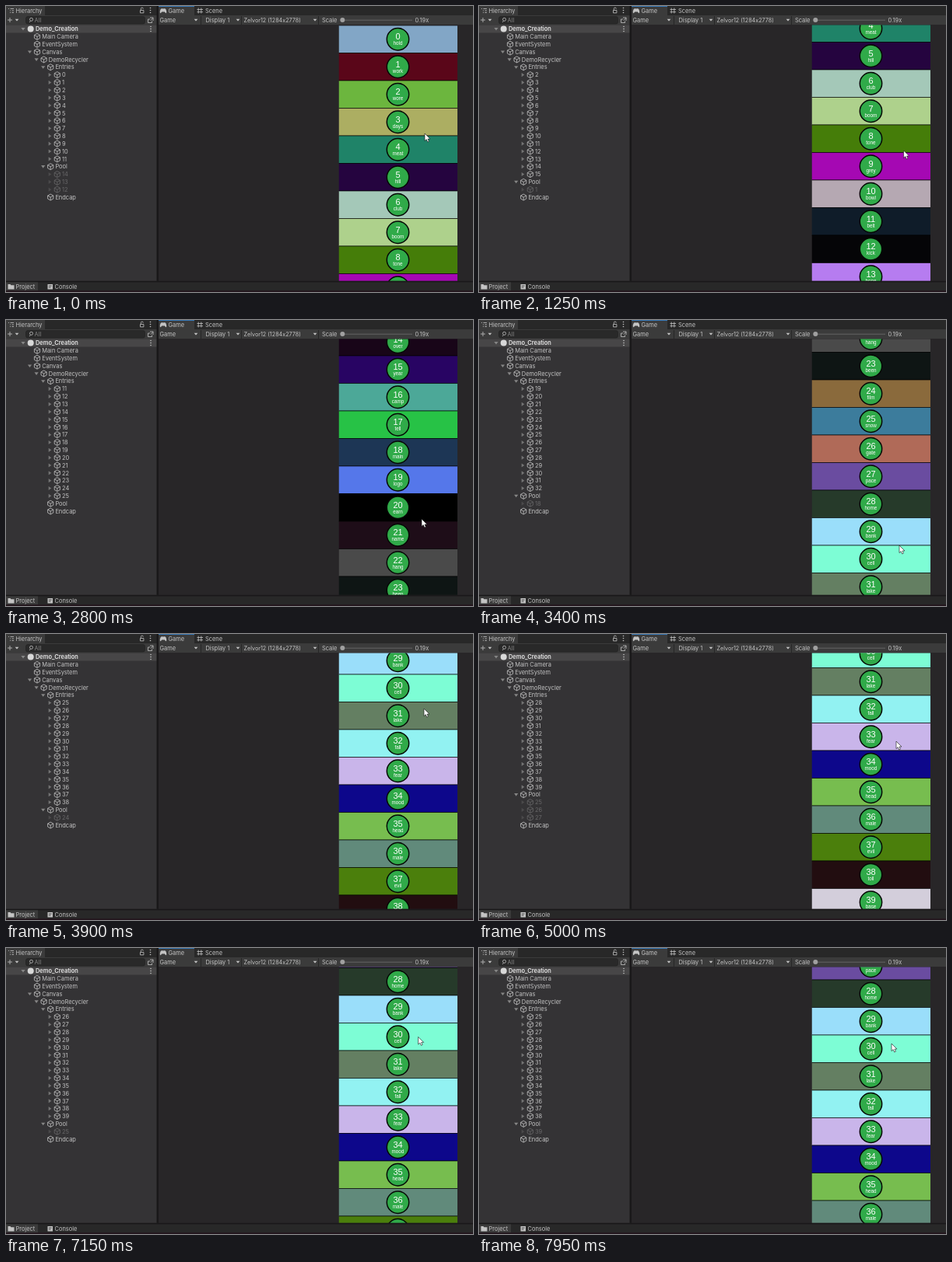
Write an HTML page that moves like this. It is 600 px wide and 368 px high and loops after 8000 ms.

```html
<!DOCTYPE html>
<html lang="en">
<head>
<meta charset="utf-8">
<title>Recycler list demo</title>
<style>
html, body { margin: 0; width: 100%; height: 100%; overflow: hidden; background: #282628; }
svg { display: block; width: 600px; height: 368px; }
text { font: 7.45px Inter, Roboto, sans-serif; fill: #c4c4c4; }
.bold { font-weight: 600; fill: #e6e6e6; }
.dim { fill: #858585; }
.off { opacity: .36; }
.line { fill: none; stroke: #c4c4c4; stroke-width: .8; }
.num, .word { font-family: "Liberation Sans", Arial, sans-serif; fill: #fff; text-anchor: middle; }
.num { font-size: 11px; }
.word { font-size: 6.3px; }
</style>
</head>
<body>
<svg viewBox="0 0 600 368">
  <defs>
    <clipPath id="view"><rect x="427.5" y="24.5" width="152.5" height="329.5"/></clipPath>
    <g id="cube" class="line"><path d="M0-4 3.6-2V2L0 4-3.6 2V-2ZM-3.6-2 0 0 3.6-2M0 0V4"/></g>
    <path id="open" d="M-2.6-1.6H2.6L0 2Z" fill="#858585"/>
    <path id="shut" d="M-1.6-2.6V2.6L2 0Z" fill="#747474"/>
    <path id="drop" d="M-2.4-1.2H2.4L0 1.6Z" fill="#c4c4c4"/>
    <g id="dots" fill="#c4c4c4"><circle cy="-3" r=".8"/><circle r=".8"/><circle cy="3" r=".8"/></g>
  </defs>

  <rect width="600" height="368" fill="#282628"/>

  <!-- Hierarchy panel -->
  <rect width="194" height="354" fill="#343335"/>
  <rect width="194" height="12" fill="#282828"/>
  <rect width="50" height="12" fill="#3b3b3b"/>
  <rect y="12" width="194" height="12" fill="#3b3b3b"/>
  <rect y="24.5" width="194" height="10" fill="#474647"/>
  <path class="line" d="M3 3.5H4M5.5 3.5H10M5 6H6M7.5 6H10M5 8.5H6M7.5 8.5H10"/>
  <text x="12.5" y="8.8">Hierarchy</text>
  <path class="line" d="M172.5 5.5h4.4v3.4h-4.4ZM173.3 5.3V3.6a1.5 1.5 0 0 1 3 0"/>
  <use href="#dots" x="185.5" y="5.5"/>
  <path class="line" stroke-width="1" d="M2 18H8M5 15V21"/>
  <use href="#drop" x="14" y="18"/>
  <rect x="25.5" y="13.5" width="153" height="9.5" rx="2.5" fill="#292929" stroke="#202020" stroke-width=".6"/>
  <path class="line" d="M30 21 31.5 19.3"/><circle class="line" cx="32.5" cy="17.3" r="2"/>
  <text class="dim" x="36.5" y="20.7">All</text>
  <path class="line" d="M185 15H189V19M186 18.5 189 15.2M185 17H182.5V21.5H187.5V19.5"/>
  <use href="#open" x="22" y="29.5"/>
  <circle cx="31.7" cy="29.5" r="4" fill="#d8d8d8"/>
  <text class="bold" x="38" y="32.2">Demo_Creation</text>
  <use href="#dots" x="186" y="29.5"/>
  <g id="tree"></g>

  <!-- Game panel -->
  <rect x="193.5" width="2.5" height="355" fill="#191819"/>
  <rect x="196" width="404" height="12" fill="#282828"/>
  <rect x="196" width="46" height="12" fill="#3b3b3b"/>
  <rect x="196" width="46" height="1" fill="#397ab8"/>
  <rect x="196" y="12" width="404" height="12" fill="#3b3b3b"/>
  <path d="M198 9.2Q197 8 198.5 4.5Q199.5 2.5 202 3.5Q204.5 2.5 205.5 4.5Q207 8 206 9.2Q205 9.6 203.8 7.5H200.2Q199 9.6 198 9.2Z" fill="#c4c4c4"/>
  <text x="208.5" y="8.8">Game</text>
  <path class="line" d="M247.2 2.5V9.5M250.8 2.5V9.5M245.5 4.5H253M245.5 7.7H253"/>
  <text x="256" y="8.8">Scene</text>
  <path d="M250.5 13V24M302.5 13V24M401.5 13V24" stroke="#262626"/>
  <text x="197.5" y="20.7">Game</text><use href="#drop" x="244" y="18"/>
  <text x="256.5" y="20.7">Display 1</text><use href="#drop" x="298" y="18"/>
  <text x="305.5" y="20.7" style="font-size:7.2px">Zelvor12 (1284x2778)</text><use href="#drop" x="397" y="18"/>
  <text x="406" y="20.7">Scale</text>
  <path d="M430 18.2H522" stroke="#656565"/>
  <circle cx="432.3" cy="18" r="3" fill="#a0a0a0"/>
  <text x="525.5" y="20.7">0.19x</text>
  <g clip-path="url(#view)"><g id="rows"></g></g>

  <!-- Bottom tabs -->
  <rect y="353.8" width="600" height="15" fill="#282828"/>
  <rect y="353.8" width="600" height="1.6" fill="#191819"/>
  <rect y="355.4" width="41" height="11" fill="#3b3b3b"/>
  <rect y="366.2" width="600" height="2" fill="#23161d"/>
  <path d="M2.5 358H5.5L6.5 359.2H10.5V364.5H2.5Z" fill="#c4c4c4"/>
  <text x="12.5" y="363.8">Project</text>
  <path d="M53.5 358H60V364.5H53.5Z" fill="#c4c4c4"/>
  <path d="M54.8 360H58.7M54.8 362H57.5" stroke="#282828" stroke-width=".8"/>
  <text x="62.5" y="363.8">Console</text>

  <g id="cursor">
    <path d="M0 0V9.6L2.2 7.6 3.7 11 5.4 10.2 4 7H7Z" fill="#fff" stroke="#111" stroke-width=".6"/>
    <g id="busy" fill="none">
      <circle cx="8" cy="-.8" r="3.6" stroke="#2f62b5" stroke-width="2.2"/>
      <path d="M8-4.4A3.6 3.6 0 0 1 11.6-.8" stroke="#8fbcf0" stroke-width="1.8"/>
    </g>
  </g>
</svg>
<script>
const LOOP = 8000, STEP = 50, TREE_LAG = 75;
const PITCH = 35.5, TOP = 25, VIEW_TOP = 24, VIEW_BOTTOM = 354;
const COUNT = 40, CACHE = 2, OBJECTS = 15;

const words = ("hold work wore days meat hill club boom tone grey bowl belt kick hope over year camp tell main logo " +
  "earn name hang been film snow gate pace home bank cell lake fall fear mood head male evil toll base").split(" ");
const colors = ("82a6c6 5a0619 6cb63e acae62 1f8368 25043f a4c8b8 aed18c 457d09 a508b3 b5a8b2 0f1c29 050507 b67cf0 " +
  "180518 280463 4ca898 27c246 1d3655 5577ea 000000 1e0d18 4a4a4a 0e1514 8a6a3c 3c7c9c b06a58 6a4ca0 263a2a 9adefa " +
  "7dfdd5 647f62 92f2f2 c9b5ea 0d078b 77bd4f 618a7b 4b7f0c 220d10 d3cedb").split(" ");

// time, cursor x, cursor y, scroll offset
const path = [
  [0, 538, 164, 0], [450, 541, 318, 0], [700, 541, 322, 0], [1150, 546, 170, 150],
  [1400, 545, 210, 165], [1700, 543, 299, 165], [1950, 541, 219, 245], [2200, 541, 130, 334],
  [2600, 538, 306, 461], [2800, 534, 256, 511.5], [3050, 536, 130, 637], [3400, 540, 290, 800],
  [3650, 541, 310, 824], [3900, 537, 96, 1038], [4100, 537, 80, 1075], [4500, 540, 190, 1090],
  [5000, 536, 138, 1082], [5500, 534, 150, 1070], [6200, 529, 192, 1027], [6350, 528, 194, 1025],
  [6800, 527, 215, 1004], [7200, 530, 100, 992], [7900, 530, 122, 979], [8000, 530, 124, 977]
];

const $ = id => document.getElementById(id);
const tree = $("tree"), rows = $("rows"), cursor = $("cursor"), busy = $("busy");

rows.innerHTML = words.map((word, i) => `<g transform="translate(427.5 ${TOP + i * PITCH})">
  <rect width="152.5" height="${PITCH}" fill="#${colors[i]}"/>
  <path d="M0 0H152.5M0 ${PITCH}H152.5" stroke="#000" stroke-opacity=".8" stroke-width=".8"/>
  <circle cx="76" cy="17.8" r="14.2" fill="#30aa49" stroke="#050805" stroke-width="1.5"/>
  <text class="num" x="76" y="18.2">${i}</text>
  <text class="word" x="76" y="25.3">${word}</text></g>`).join("");

function pose(t) {
  const i = Math.max(1, path.findIndex(key => key[0] >= t));
  const a = path[i - 1], b = path[i], k = (t - a[0]) / (b[0] - a[0]);
  return a.map((v, n) => v + (b[n] - v) * k);
}

const node = (label, depth, arrow = "", off = false) => ({ label, depth, arrow, off });

function drawNode({ label, depth, arrow, off }, i) {
  const y = 39.4 + i * 9.84, x = depth * 8.6;
  return `<g class="${off ? "off" : ""}">
    ${arrow && `<use href="#${arrow}" x="${30.5 + x}" y="${y}"/>`}
    <use href="#cube" x="${40 + x}" y="${y}"/>
    <text x="${46.2 + x}" y="${y + 2.7}">${label}</text></g>`;
}

const range = (from, to) => Array.from({ length: Math.max(0, to - from + 1) }, (_, i) => from + i);

let shown = "";
function drawTree(scroll, reverse) {
  const firstSeen = Math.floor((scroll + VIEW_TOP - TOP) / PITCH);
  const lastSeen = Math.floor((scroll + VIEW_BOTTOM - TOP) / PITCH);
  const first = Math.max(0, firstSeen - CACHE);
  const last = Math.min(COUNT - 1, lastSeen + CACHE);
  const spare = OBJECTS - (last - first + 1);
  const above = first < spare || (reverse && last + spare < COUNT);
  const pool = above ? range(last + 1, last + spare).reverse() : range(first - spare, first - 1);
  const key = [first, last, pool].join();
  if (key === shown) return;
  shown = key;
  tree.innerHTML = [
    node("Main Camera", 0), node("EventSystem", 0), node("Canvas", 0, "open"),
    node("DemoRecycler", 1, "open"), node("Entries", 2, "open"),
    ...range(first, last).map(n => node(n, 3, "shut")),
    node("Pool", 2, pool.length ? "open" : ""),
    ...pool.map(n => node(n, 3, "shut", true)),
    node("Endcap", 2)
  ].map(drawNode).join("");
}

const start = performance.now();
function frame() {
  const t = Math.floor((performance.now() - start) % LOOP / STEP) * STEP;
  const [, x, y, scroll] = pose(t);
  rows.setAttribute("transform", `translate(0 ${-scroll})`);
  cursor.setAttribute("transform", `translate(${x} ${y})`);
  busy.style.display = t >= 1700 && t < 2200 ? "" : "none";
  drawTree(pose(Math.max(0, t - TREE_LAG))[3], t > 6500);
  requestAnimationFrame(frame);
}
frame();
</script>
</body>
</html>
```
